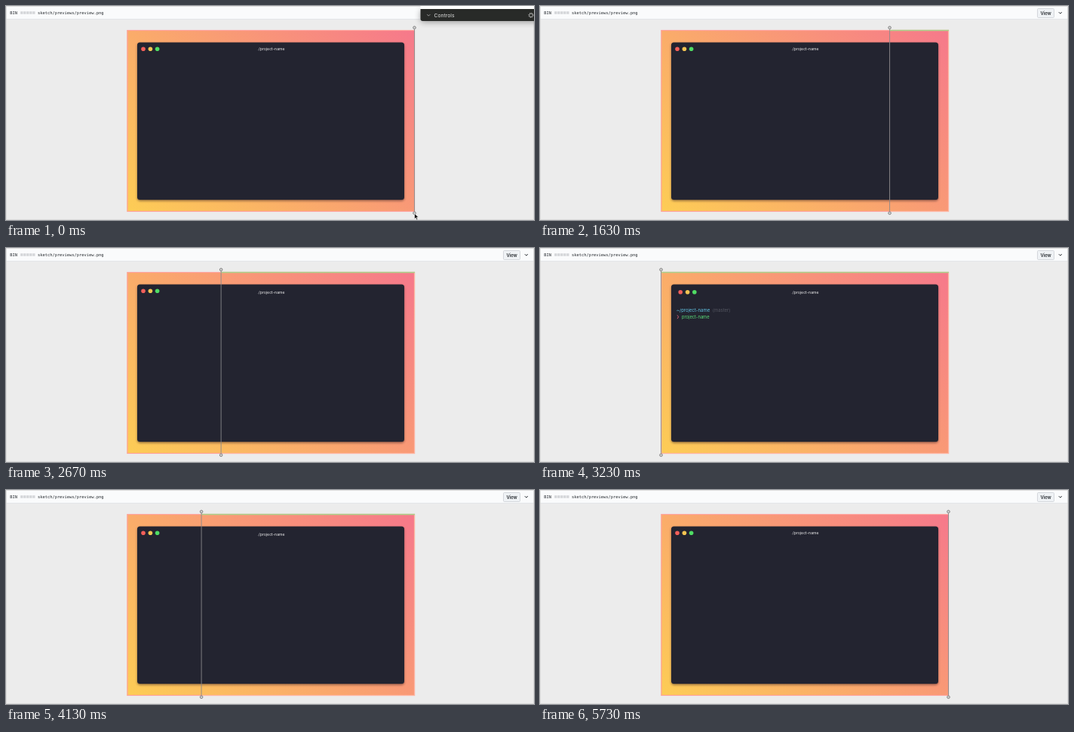
An HTML page that plays this animation: 700 px wide and 285 px high, repeating every 5760 ms.

```html
<!DOCTYPE html>
<html lang="en">
<head>
<meta charset="utf-8">
<title>Image swipe comparison</title>
<style>
  html, body { margin: 0; width: 100%; height: 100%; overflow: hidden; background: #ececec; }
  svg { display: block; width: 700px; height: 285px; }
  text { font-family: Inter, Roboto, sans-serif; }
  .mono { font: 5.38px "DejaVu Sans Mono", "Noto Sans Mono", monospace; fill: #24292e; }
</style>
</head>
<body>
<svg viewBox="0 0 700 285">
  <defs>
    <linearGradient id="warm" gradientUnits="userSpaceOnUse" x1="195" y1="309" x2="507" y2="-3">
      <stop offset="0" stop-color="#fdcd55"/>
      <stop offset="1" stop-color="#f6788b"/>
    </linearGradient>
    <filter id="soft" x="-10%" y="-10%" width="120%" height="125%">
      <feGaussianBlur stdDeviation="1.6"/>
    </filter>
    <filter id="wide" x="-20%" y="-100%" width="140%" height="300%">
      <feGaussianBlur stdDeviation="4"/>
    </filter>
    <clipPath id="after"><rect id="cut" y="0" width="700" height="285"/></clipPath>
    <g id="base">
      <rect x="160.5" y="32" width="381.5" height="242" fill="url(#warm)"/>
      <rect x="174" y="50" width="354" height="209.5" rx="4" fill="#3a2020" opacity=".6" filter="url(#soft)"/>
      <rect x="174" y="48.5" width="354" height="209.5" rx="3.5" fill="#232430"/>
    </g>
    <g id="dots">
      <circle r="2.8" fill="#f25f5a"/>
      <circle cx="9.4" r="2.8" fill="#f6c452"/>
      <circle cx="18.6" r="2.8" fill="#4fdc64"/>
    </g>
    <g id="knob">
      <circle r="1.8" fill="#d4d4d4" stroke="#777" stroke-width=".9"/>
    </g>
  </defs>

  <rect width="700" height="285" fill="#ececec"/>
  <rect width="700" height="17.5" fill="#fafbfc"/>
  <path d="M0 17.5H700" stroke="#e1e4e8" stroke-width=".8"/>
  <rect x=".5" y=".5" width="699" height="284" fill="none" stroke="#d8d8d8" stroke-width=".8"/>
  <text class="mono" x="5.3" y="10.7">BIN</text>
  <path d="M19.2 9H38.6" stroke="#d3d5d8" stroke-width="3.5" stroke-dasharray="3.3 .7"/>
  <text class="mono" x="42" y="10.7">sketch/previews/preview.png</text>
  <rect x="659.5" y="3.5" width="22" height="12" rx="1.2" fill="#eff2f5" stroke="#ccd0d5" stroke-width=".8"/>
  <text x="670.5" y="11.7" font-size="5.9" font-weight="600" fill="#24292e" text-anchor="middle">View</text>
  <path d="M687.8 8.2l2 2l2-2" fill="none" stroke="#24292e" stroke-width="1"/>

  <g>
    <use href="#base"/>
    <use href="#dots" x="182" y="57.3"/>
    <text x="351.5" y="59.3" font-size="5.2" fill="#eee" text-anchor="middle">./project-name</text>
    <rect x="161" y="32.5" width="380.5" height="241" fill="none" stroke="#ffa09a" stroke-width="1.2"/>
  </g>
  <g clip-path="url(#after)">
    <use href="#base"/>
    <use href="#dots" x="186.2" y="58.8"/>
    <text x="351.5" y="60.9" font-size="5.2" fill="#eee" text-anchor="middle">./project-name</text>
    <text x="181" y="85" font-size="6" fill="#62c4e4">~/project-name</text>
    <text x="228.8" y="85" font-size="5.95" fill="#555762">(master)</text>
    <path d="M182 89.4l1.6 2.4l-1.6 2.4" fill="none" stroke="#e0647c" stroke-width=".9"/>
    <text x="188" y="94" font-size="5.75" fill="#5be07a">project-name</text>
    <rect x="161" y="32.5" width="380.5" height="241" fill="none" stroke="#ffb4a0" stroke-width="1.2"/>
    <path d="M160.5 32.5H542" stroke="#a9cf88" stroke-width="1.3"/>
  </g>

  <g id="slider">
    <path d="M0 31V273.5" stroke="#8a8a8c" stroke-width=".9"/>
    <use href="#knob" y="28.8"/>
    <use href="#knob" y="275.8"/>
  </g>

  <g id="panel">
    <rect x="550" y="6" width="160" height="15" fill="#000" opacity=".4" filter="url(#wide)"/>
    <rect x="549.5" width="151" height="6" fill="#fff"/>
    <path d="M549.5 4H700V20H552.5Q549.5 20 549.5 17Z" fill="#282a28"/>
    <path d="M558.3 11.2l2 2l2-2" fill="none" stroke="#999" stroke-width="1"/>
    <text x="567.5" y="15.1" font-size="6.8" fill="#e0e0e0">Controls</text>
    <circle cx="696" cy="12.3" r="2.3" fill="none" stroke="#aaa" stroke-width="1"/>
    <circle cx="696" cy="12.3" r="3.1" fill="none" stroke="#aaa" stroke-width="1" stroke-dasharray="1.2 1.235"/>
  </g>

  <g id="arrow">
    <path d="M0 0V7.4L1.8 5.8L3 8.6L4.3 8L3.1 5.3H5.5Z" fill="#111" stroke="#fff" stroke-width=".6"/>
  </g>
  <g id="hand">
    <path d="M-1.4-3.4Q-.6-4.4 0-3.4L.6-1L2.6-.8Q4-.4 3.8 1.4L3 4.2H-1.2L-3.6 1Q-3.6 0-2.4.2L-1.2 1Z"
      fill="#fff" stroke="#222" stroke-width=".8" stroke-linejoin="round"/>
    <path d="M.5 1.2V3M1.8 1.2V3" stroke="#555" stroke-width=".4"/>
  </g>
</svg>
<script>
  const LOOP = 5760;
  const $ = id => document.getElementById(id);

  // Rows are [time, value, ...].
  const swipe = [[1040, 541.5], [1100, 517], [1300, 500], [1800, 445], [2170, 397.5],
    [2600, 305], [3000, 193], [3150, 160.5], [3640, 160.5], [3850, 186],
    [4130, 258.5], [4350, 385], [4520, 505], [4600, 541.5]];
  const pointer = [[640, 541.5, 276.3], [1030, 518.5, 276.3], [1300, 500, 279], [1600, 468, 288],
    [4520, 540, 290], [4620, 562, 276], [4730, 573, 257], [4850, 574, 253],
    [5050, 594, 140], [5250, 607, 7]];

  function sample(rows, t) {
    const i = rows.findIndex(row => row[0] > t);
    if (i === 0) return rows[0].slice(1);
    if (i < 0) return rows[rows.length - 1].slice(1);
    const a = rows[i - 1], b = rows[i];
    const k = (t - a[0]) / (b[0] - a[0]);
    return a.slice(1).map((v, n) => v + (b[n + 1] - v) * k);
  }

  const show = (node, on) => node.setAttribute("visibility", on ? "visible" : "hidden");
  const place = (node, x, y) => node.setAttribute("transform", `translate(${x} ${y})`);

  function draw() {
    const t = performance.now() % LOOP;
    const [x] = sample(swipe, t);
    const [px, py] = sample(pointer, t);
    const grabbing = t >= 4600 && t < 4880;
    place($("slider"), x, 0);
    $("cut").setAttribute("x", x);
    place($("arrow"), px, py);
    place($("hand"), px, py);
    show($("hand"), grabbing);
    show($("arrow"), !grabbing && t < 5260);
    show($("panel"), t < 30);
    requestAnimationFrame(draw);
  }
  draw();
</script>
</body>
</html>
```
